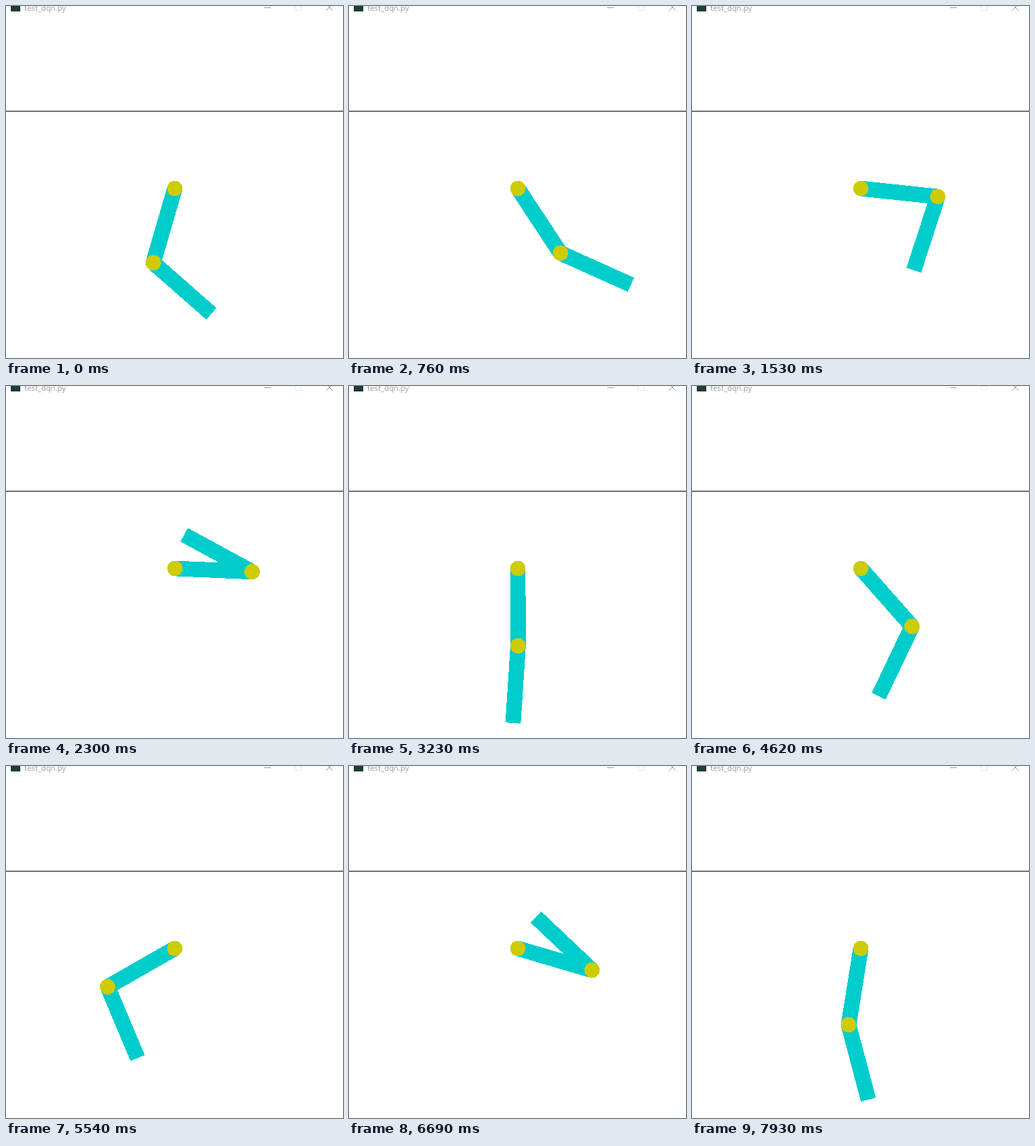
Recreate the animation shown at these times as an HTML page. Size 495x517 px, loop 8000 ms.

```html
<!DOCTYPE html>
<html lang="en">
<head>
<meta charset="utf-8">
<title>Acrobot</title>
<style>
html, body { margin: 0; width: 100%; height: 100%; overflow: hidden; background: #fff; }
svg { display: block; width: 495px; height: 517px; }
.title { font: 11.3px "Open Sans", "Noto Sans", sans-serif; fill: #999; }
.button { fill: none; stroke: #999; }
.faint { stroke: #e8e8e8; }
.link { fill: #00cccc; }
.joint { fill: #cccc00; }
</style>
</head>
<body>
<svg viewBox="0 0 495 517">
  <rect x="7" y="-6" width="14" height="14" fill="#1e3c34"/>
  <text class="title" x="27" y="7">test_dqn.py</text>
  <path class="button" d="M379 2.5h10"/>
  <path class="button faint" d="M424.5 -3v9.5h9v-9.5"/>
  <path class="button" d="M470 -3l10 10M480 -3l-10 10"/>
  <rect y="154" width="495" height="1"/>
  <g shape-rendering="crispEdges">
    <g id="upper">
      <rect class="link" x="-11.36" width="22.72" height="113.6"/>
      <circle class="joint" r="11.36"/>
      <g id="lower">
        <rect class="link" x="-11.36" width="22.72" height="113.6"/>
        <circle class="joint" r="11.36"/>
      </g>
    </g>
  </g>
</svg>
<script>
const LOOP = 8000;

// Each link swings between turning points. Angles are degrees from straight down,
// positive to the right; time is counted in simulation steps.
const swing = (turnTime, angles) => n => {
  let j = 0;
  while (j < angles.length - 2 && turnTime(j + 1) <= n) j++;
  const from = turnTime(j), to = turnTime(j + 1);
  const u = Math.min((n - from) / (to - from), 1);
  return angles[j] + (angles[j + 1] - angles[j]) * (1 - Math.cos(Math.PI * u)) / 2;
};
const every = (gap, first) => j => first + gap * j;

// Swings that quicken halfway through the episode and slow down again.
const uneven = lead => j => 5.07 * j + 2 * Math.sin(Math.PI * j / 5) - lead;

const episodes = [
  {
    start: -5, step: 76.67, last: 35,
    upper: swing(every(5.55, -2.85), [44.5, -72, 70, -92, 88.9, -60, 90, -97]),
    lower: swing(every(5.8, -5.6), [-50, 49, -63, 102, -66, 65, -130, 118.7])
  },
  {
    start: 3230, step: 76.96, last: 51, pause: 28,
    upper: swing(uneven(0), [0.2, 14, -32, 53, -63, 69, -72.4, 94, -66, 77, -101]),
    lower: swing(uneven(0.5), [-3.5, -20, 37, -47.7, 48, -66, 47.3, -80, 25, -153, 136.4])
  },
  {
    start: 7700, step: 76.96, last: 3,
    upper: swing(every(3, 0), [-1, -9.1]),
    lower: swing(every(3, 0), [3, 14.8])
  }
];

const upper = document.getElementById("upper");
const lower = document.getElementById("lower");

// The screen updates in whole steps, each on a 10 ms grid.
function stepAt({ start, step, last, pause }, t) {
  let n = 0;
  while (n < last && Math.round((start + (n + 1) * step) / 10) * 10 <= t) n++;
  return n === pause ? n - 1 : n;
}

function draw() {
  const t = performance.now() % LOOP;
  const episode = episodes.filter(e => e.start <= t).pop();
  const n = stepAt(episode, t);
  const a = episode.upper(n), b = episode.lower(n);
  upper.setAttribute("transform", `translate(248 268) rotate(${-a})`);
  lower.setAttribute("transform", `translate(0 113.6) rotate(${a - b})`);
  requestAnimationFrame(draw);
}
draw();
</script>
</body>
</html>
```
